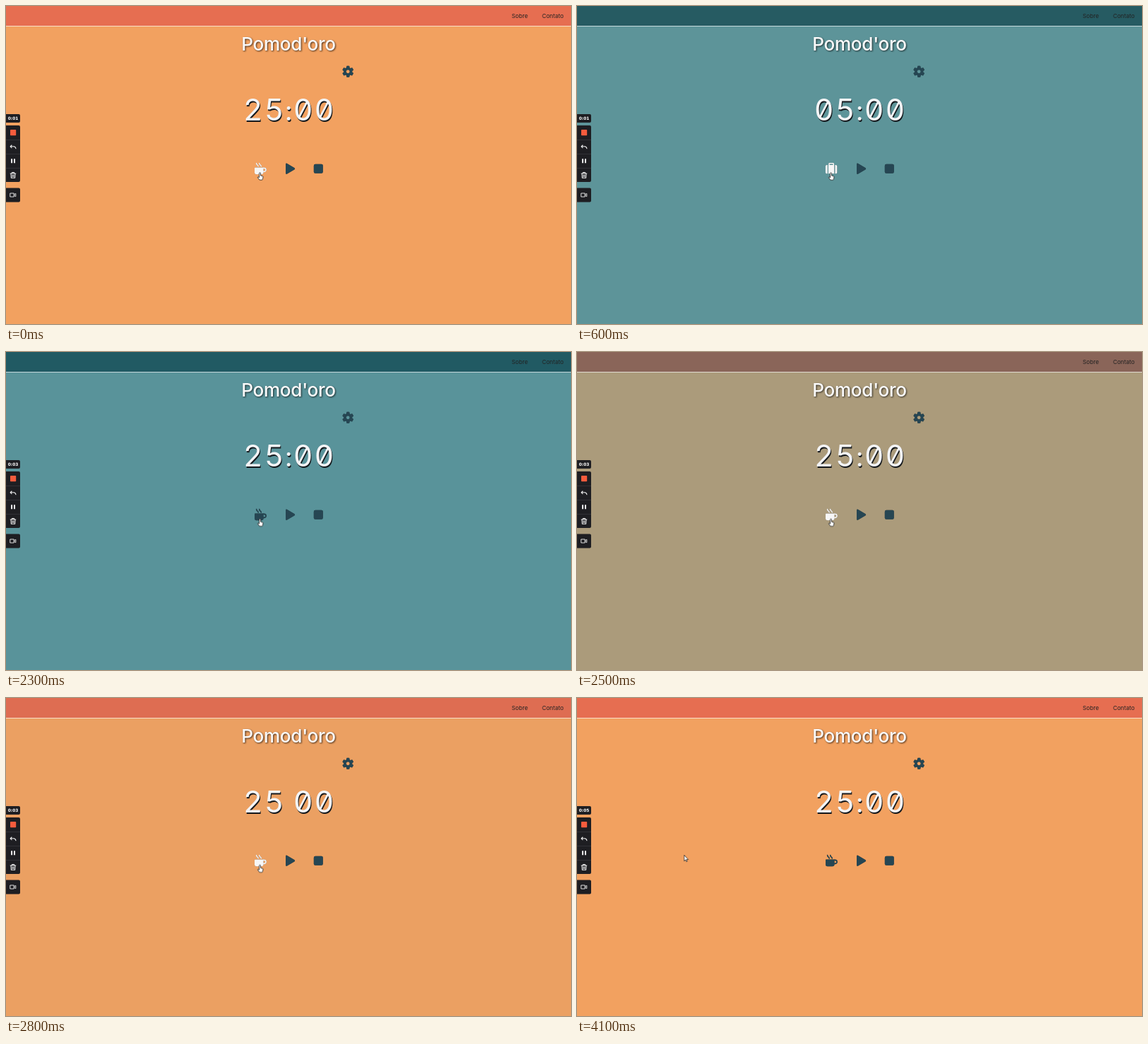
Write an HTML page that moves like this. It is 800 px wide and 450 px high and loops after 4200 ms.

```html
<!DOCTYPE html>
<html lang="pt">
<head>
<meta charset="utf-8">
<title>Pomod'oro</title>
<style>
  html, body { margin: 0; width: 100%; height: 100%; overflow: hidden; background: #f2a160; }
  svg { display: block; width: 800px; height: 450px; font-family: Inter, "Open Sans", sans-serif; }
  .nav { font-size: 8.1px; fill: #222; letter-spacing: .08px; }
  .title { font-size: 26.2px; font-weight: 500; fill: #fafafa; letter-spacing: -.35px; filter: drop-shadow(1.5px 1.5px 1px rgba(0,0,0,.7)); }
  .clock { font-size: 43px; font-weight: 400; fill: #f4f5f7; font-feature-settings: "zero", "tnum"; filter: drop-shadow(1.5px 2.4px 0 #14181c); }
  #colon { font-size: 38px; }
  .icons { filter: drop-shadow(.6px .8px .6px rgba(0,0,0,.5)); }
  .dark { color: #264653; }
  .icon { fill: currentColor; stroke: none; }
  .line { fill: none; stroke: currentColor; stroke-linecap: round; stroke-linejoin: round; }
  .panel { fill: #1e1e22; }
  .rec { font: bold 5.9px "DejaVu Sans", sans-serif; fill: #fff; }
  .tool { fill: none; stroke: #f2f2f2; stroke-width: 1.1; stroke-linecap: round; stroke-linejoin: round; }
  .pointer { fill: #fff; stroke: #222; stroke-width: .8; stroke-linejoin: round; }
</style>
</head>
<body>
<svg viewBox="0 0 800 450">
  <rect id="page" width="800" height="450" fill="#f2a160"/>
  <rect id="bar" width="800" height="28" fill="#e66e51"/>
  <rect y="28" width="800" height="1" fill="#fff" opacity=".65"/>
  <g class="nav" text-anchor="middle">
    <text x="727.5" y="17">Sobre</text>
    <text x="774.3" y="17">Contato</text>
  </g>
  <text class="title" x="400" y="63.2" text-anchor="middle">Pomod'oro</text>

  <g class="clock" text-anchor="middle">
    <text id="tens" x="349.6" y="162.3">2</text>
    <text x="379.6" y="162.3">5</text>
    <text id="colon" x="400" y="162.3">:</text>
    <text x="420.6" y="162.3">0</text>
    <text x="450.4" y="162.3">0</text>
  </g>

  <g class="icons dark">
    <g id="gear" transform="translate(484.2 92.8)">
      <circle class="line" r="4.3" stroke-width="3.6"/>
    </g>
    <path class="icon" d="M396 224.2q0-2.4 2.1-1.3l10.2 6q1.6 1.3 0 2.6l-10.2 6q-2.1 1.1-2.1-1.3z"/>
    <rect class="icon" x="435.8" y="223.7" width="13" height="13" rx="2.2"/>
  </g>

  <g class="icons" id="mode">
    <g id="cup">
      <path class="icon" d="M352 229.3q0-.8.8-.8h11.7v7q0 2.7-2.7 2.7h-7.1q-2.7 0-2.7-2.7z"/>
      <path class="line" stroke-width="1.7" d="M364.5 229.4h1a2.5 2.5 0 0 1 0 5h-1"/>
      <path class="line" stroke-width="1.5" d="M354.6 222.6q.1 1.5 1.3 2.2t1.3 2.1m1.5-4.3q.1 1.5 1.3 2.2t1.3 2.1"/>
    </g>
    <g id="bag">
      <path class="icon" d="M354.8 225v12.3h-1.2q-1.7 0-1.7-1.7v-8.9q0-1.7 1.7-1.7zm10.6 0v12.3h1.2q1.7 0 1.7-1.7v-8.9q0-1.7-1.7-1.7zM356 225h8.2v12.3H356z"/>
      <path class="line" stroke-width="1.6" d="M357 225v-1.8q0-.5.5-.5h5.2q.5 0 .5.5v1.8"/>
    </g>
  </g>

  <g class="panel">
    <path d="M0 153h18q2 0 2 2v8q0 2-2 2H0zM0 169h18q2 0 2 2v76q0 2-2 2H0zM0 257.5h18q2 0 2 2v16q0 2-2 2H0z"/>
    <path d="M0 189.5h20M0 209.5h20M0 229.5h20" stroke="#3a3a40" stroke-width=".7"/>
  </g>
  <text class="rec" id="rec" x="10" y="161.2" text-anchor="middle">0:01</text>
  <rect x="6" y="175" width="8.2" height="8.2" rx=".8" fill="#f65c3d"/>
  <g class="tool">
    <path d="M8 197l-1.9 1.8 1.9 1.8M6.3 198.8h4.5q2.8.1 3.1 3"/>
    <path d="M8.1 216.3v6M12 216.3v6" stroke-width="2" stroke-linecap="butt"/>
    <path d="M6.2 237h7.6M8.5 237v-1.5h3V237M7 237l.4 6.2h5.2L13 237M9.1 239v2.5M10.9 239v2.5"/>
    <path d="M6.2 265h5v5h-5zM11.4 267l2.4-1.6v4.2l-2.4-1.6" stroke-width=".9"/>
  </g>

  <g id="cursor" class="pointer">
    <path id="hand" d="M-1.4-4.3a.95.95 0 0 1 1.9 0V-1l2.5.5q1.1.3 1 1.3l-.5 2.8q-.2 1-.7 1.5h-3.9l-2.5-3.3q-.4-.9.5-1l1.7.9z"/>
    <path id="arrow" d="M-.6-4.8v8.6l2-1.8 1.2 2.7 1.2-.5-1.2-2.6h2.6z"/>
  </g>
</svg>
<script>
  const LOOP = 4200, STEP = 100;
  const el = id => document.getElementById(id);
  const show = (id, on) => el(id).style.display = on ? '' : 'none';

  for (let i = 0; i < 6; i++) {
    const tooth = document.createElementNS('http://www.w3.org/2000/svg', 'rect');
    const attrs = { class: 'icon', x: -2.2, y: -8, width: 4.4, height: 3.6, rx: 1, transform: `rotate(${i * 60})` };
    for (const k in attrs) tooth.setAttribute(k, attrs[k]);
    el('gear').append(tooth);
  }

  // Steps are [time, value, easing]
  function track(id, prop, steps) {
    const frames = steps.map(([t, value, easing = 'linear']) => ({ offset: t / LOOP, [prop]: value, easing }));
    const anim = el(id).animate(frames, { duration: LOOP, fill: 'both' });
    anim.pause();
    return anim;
  }
  const fade = (id, work, rest) => track(id, 'fill', [
    [0, work, 'ease'], [800, rest], [2280, rest, 'ease'], [2980, work], [LOOP, work]
  ]);
  const at = (x, y) => `translate(${x}px, ${y}px)`;
  const tracks = [
    fade('page', '#f2a160', '#57939b'),
    fade('bar', '#e66e51', '#1e5a63'),
    track('cursor', 'transform', [
      [0, at(360, 241)], [3100, at(360, 241.5), 'ease-in'], [3300, at(342, 243)],
      [3500, at(240, 238), 'ease-out'], [3800, at(152.3, 227)], [LOOP, at(152.3, 227)]
    ])
  ];

  const blinks = [[700, 1000], [1700, 2000], [2700, 3000], [3800, 4000]];
  const ticks = [1000, 1900, 2900, 3800];
  const within = (t, a, b) => t >= a && t < b;

  function render(t) {
    tracks.forEach(a => a.currentTime = t);
    const pause = within(t, 100, 2300);
    const hover = t < 3300;
    const swapped = within(t, 100, 200) || within(t, 2300, 2400);
    el('tens').textContent = pause ? '0' : '2';
    show('cup', !pause);
    show('bag', pause);
    el('mode').style.color = hover && !swapped ? '#f6f6f6' : '#264653';
    show('colon', !blinks.some(([a, b]) => within(t, a, b)));
    el('rec').textContent = '0:0' + (1 + ticks.filter(k => t >= k).length);
    show('hand', hover);
    show('arrow', !hover);
  }

  function loop() {
    render(Math.floor(performance.now() % LOOP / STEP) * STEP);
    requestAnimationFrame(loop);
  }
  loop();
</script>
</body>
</html>
```
